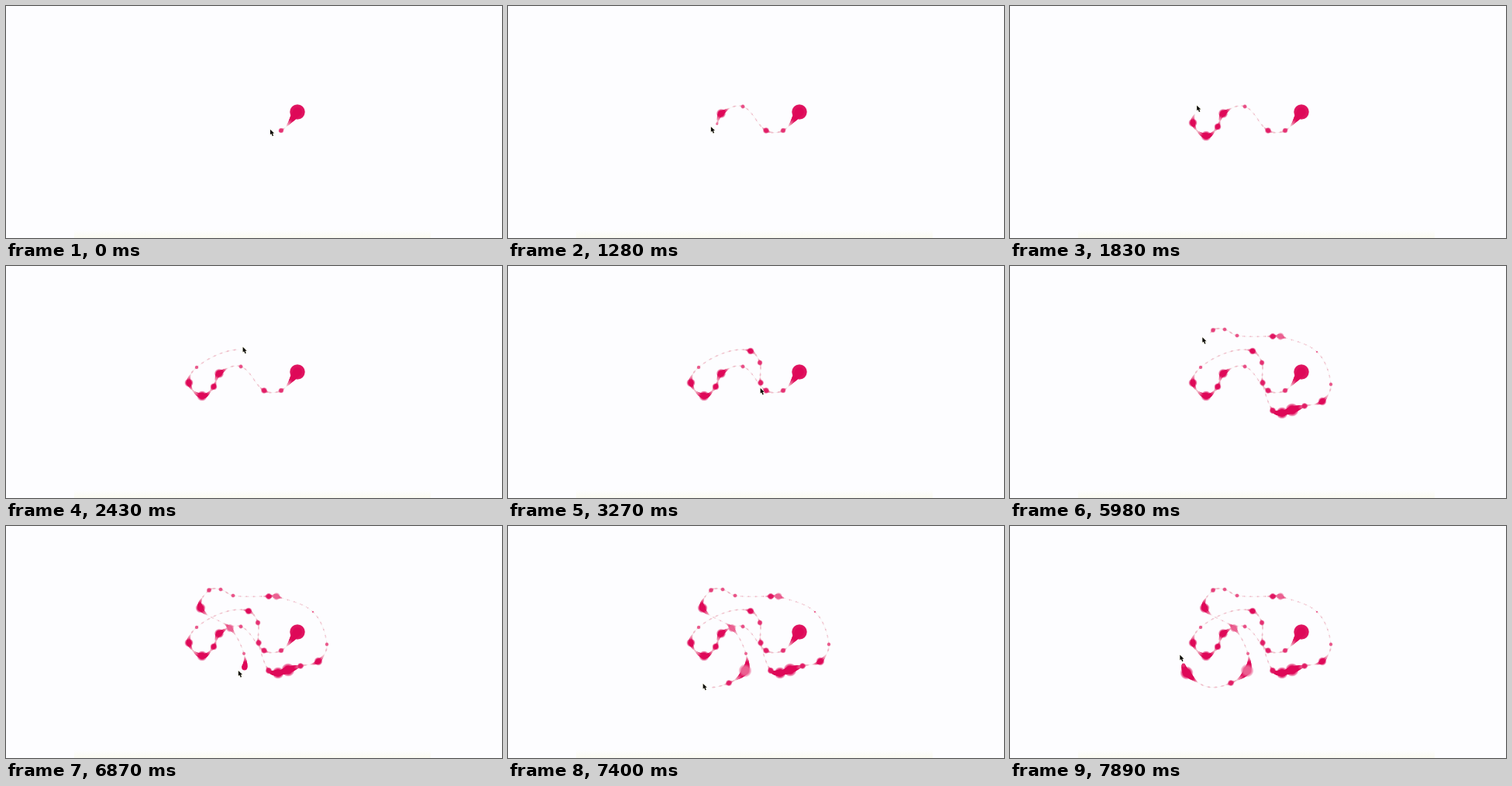
Recreate the animation shown at these times as an HTML page with a canvas. Size 640 by 300 pixels, loop 7.99 s.

```html
<!DOCTYPE html>
<html lang="en">
<head>
<meta charset="utf-8">
<title>Ink trail</title>
<style>
  html, body { margin: 0; width: 100%; height: 100%; overflow: hidden; background: #fdfdff; }
  canvas { display: block; width: 640px; height: 300px; }
</style>
</head>
<body>
<canvas id="stage" width="640" height="300"></canvas>
<script>
const ctx = document.getElementById('stage').getContext('2d');
const LOOP = 7990;
const FRAME = 41;  // ms between redraws
const LAG = 9;     // px between the pointer and the wet end of the trail
const SUB = 24;    // path samples per drop
const PALE = [240, 222, 222], PINK = [236, 108, 152], RED = [222, 8, 88];

// Ink drops the curve runs through: x, y, radius
const drops = [
  [376,137,9.5], [355,161,3], [333,161,3.5], [303,130,2.3], [275,139,5.5], [268,156,4],
  [253,168,6], [236,151,5], [246,131,2], [283,111,1], [313,110,4], [325,125,3],
  [326,151,3.5], [339,187,3.7], [351,190,7], [364,186,8], [380,181,3.5], [403,175,4.8],
  [414,153,2], [396,111,1], [349,91,4.3], [339,91,3.7], [293,90,2.2], [277,82,2.2],
  [262,83,2.7], [251,106,5.8], [289,132,4.6], [307,165,1.8], [306,187,7.8], [285,203,3.5],
  [255,208,1], [228,190,7.8], [223,176,2.7], [222,166,0]
];
const diluted = new Set([20, 26, 28]);

// Pointer: time, position counted in drops, optional redraw interval
const keys = [
  [0, 1.5], [1280, 5.25], [2430, 9.85], [3960, 15], [4310, 15], [4320, 15.8],
  [4700, 15.8], [4860, 18.8], [5360, 18.8], [5370, 21.3, 175], [5720, 23],
  [5980, 24.6], [6380, 25.3], [6870, 28.2], [7890, 32.9]
];

const lerp = (a, b, f) => a + (b - a) * f;
const clamp = v => Math.max(0, Math.min(1, v));
const mix = (a, b, f) => a.map((c, k) => Math.round(lerp(c, b[k], clamp(f))));
const dist = (a, b) => Math.hypot(b[0] - a[0], b[1] - a[1]);

// Unit tangent at each drop, from its neighbours
const dirs = drops.map((d, i) => {
  const a = drops[Math.max(0, i - 1)], b = drops[Math.min(drops.length - 1, i + 1)];
  return [0, 1].map(k => (b[k] - a[k]) / dist(a, b));
});

function hermite(i, f) {
  const a = drops[i], b = drops[i + 1], len = dist(a, b);
  const f2 = f * f, f3 = f2 * f;
  return [0, 1].map(k =>
    (2 * f3 - 3 * f2 + 1) * a[k] + (f3 - 2 * f2 + f) * len * dirs[i][k] +
    (3 * f2 - 2 * f3) * b[k] + (f3 - f2) * len * dirs[i + 1][k]);
}

// Each sample: place, travelled length, and a neck that tapers away from the drops
const samples = [];
for (let n = 0, s = 0; n <= (drops.length - 1) * SUB; n++) {
  const i = Math.min(drops.length - 2, Math.floor(n / SUB));
  const p = hermite(i, n / SUB - i);
  if (n) s += dist(samples[n - 1].p, p);
  const taper = d => d[2] * .6 - dist(d, p) * .22;
  const r = Math.max(.6 + .35 * Math.sin(s * .7), taper(drops[i]), taper(drops[i + 1]));
  const tone = r < 1.6 ? mix(PALE, PINK, r - .6) : mix(PINK, RED, r - 1.6);
  samples.push({ p, s, r, tone: `rgb(${tone})` });
}

const lengthAt = u => {
  const n = u * SUB, i = Math.floor(n);
  return lerp(samples[i].s, samples[i + 1].s, n - i);
};

// Travelled length of the pointer, held between redraws
function travelled(t) {
  let i = 0;
  while (i < keys.length - 2 && t >= keys[i + 1][0]) i++;
  const [t0, u0, step = FRAME] = keys[i], [t1, u1] = keys[i + 1];
  const shown = Math.floor((t - t0) / step + 1e-6) * step;
  return lerp(lengthAt(u0), lengthAt(u1), clamp(shown / (t1 - t0)));
}

function pointAt(s) {
  const i = samples.findIndex(q => q.s > s);
  const a = samples[i - 1], b = samples[i], f = (s - a.s) / (b.s - a.s);
  return [0, 1].map(k => lerp(a.p[k], b.p[k], f));
}

function disc(x, y, r, fill) {
  ctx.fillStyle = fill;
  ctx.beginPath();
  ctx.arc(x, y, r, 0, Math.PI * 2);
  ctx.fill();
}

function drop([x, y, r], i) {
  if (samples[i * SUB].r < .9 && r < 1.5) return;
  const rgb = mix(PINK, RED, diluted.has(i) ? .1 : (r - 1.5) / 2.5);
  const g = ctx.createRadialGradient(x, y, 0, x, y, r + .6);
  g.addColorStop(0, `rgb(${rgb})`);
  g.addColorStop(i ? .6 : .9, `rgba(${rgb},.95)`);
  g.addColorStop(1, `rgba(${rgb},.15)`);
  disc(x, y, r + .6, g);
}

function pointer(x, y) {
  ctx.save();
  ctx.translate(x, y);
  ctx.beginPath();
  [[0, 0], [0, 6.5], [1.6, 5.3], [2.8, 8.4], [4.1, 7.8], [2.9, 4.9], [5, 4.8]]
    .forEach(p => ctx.lineTo(...p));
  ctx.closePath();
  ctx.lineWidth = 1;
  ctx.strokeStyle = '#f2f0d8';
  ctx.stroke();
  ctx.fillStyle = '#080808';
  ctx.fill();
  ctx.restore();
}

function floorGlow() {
  const g = ctx.createLinearGradient(0, 289, 0, 300);
  g.addColorStop(0, 'rgba(250,250,238,0)');
  g.addColorStop(1, 'rgba(250,250,238,.8)');
  ctx.fillStyle = g;
  ctx.fillRect(88, 289, 460, 11);
}

function draw(t) {
  const head = travelled(t), end = head - LAG;
  ctx.fillStyle = '#fdfdff';
  ctx.fillRect(0, 0, 640, 300);
  floorGlow();
  for (const q of samples) {
    if (q.s > end) break;
    disc(...q.p, q.r, q.tone);
  }
  drops.forEach((d, i) => {
    if (samples[i * SUB].s <= end) drop(d, i);
  });
  const [x, y] = pointAt(head);
  pointer(x - 3, y - 4);
}

const start = performance.now();
function tick() {
  draw((performance.now() - start) % LOOP);
  requestAnimationFrame(tick);
}
tick();
</script>
</body>
</html>
```
